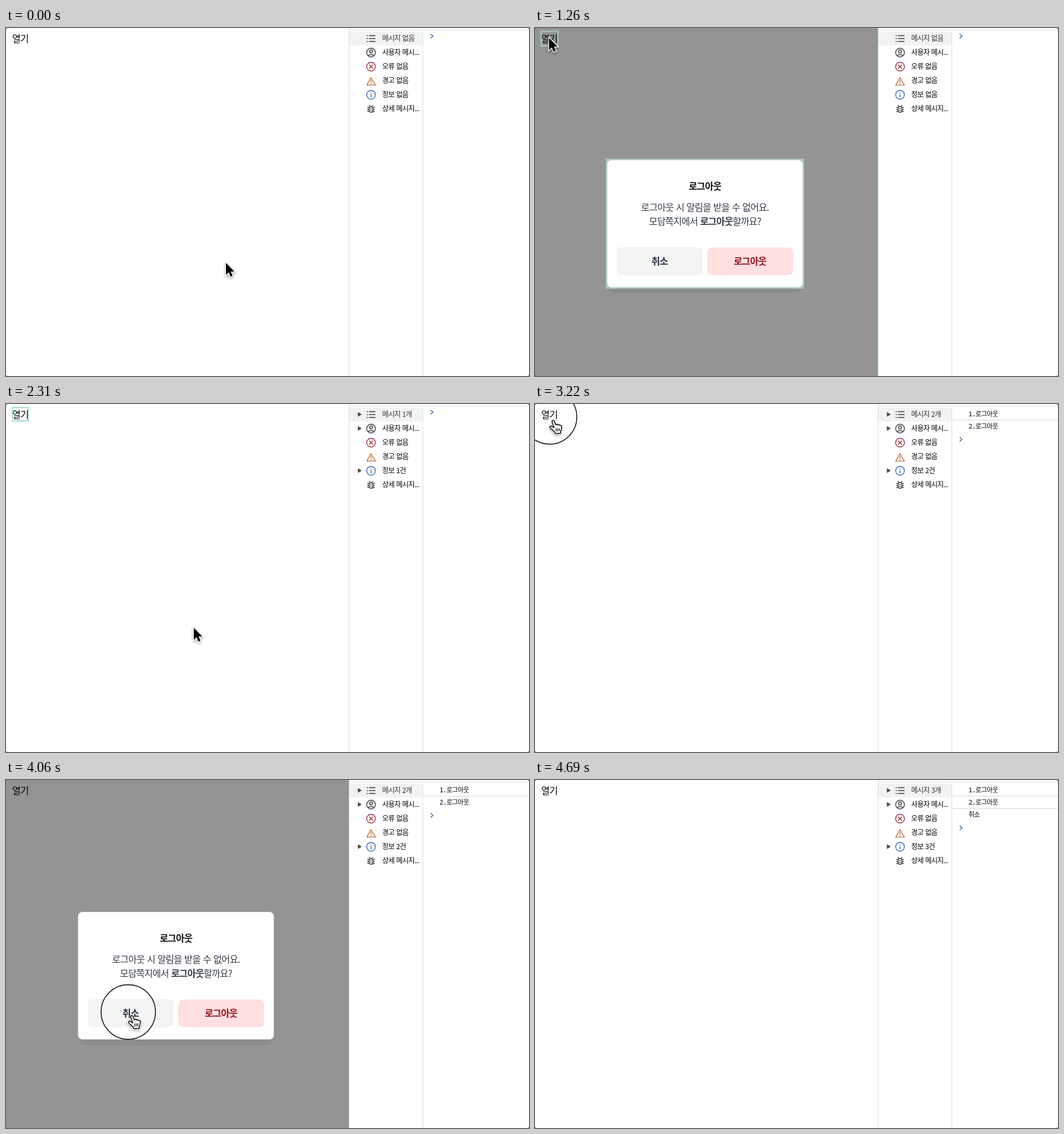
Write an HTML page with a canvas that moves like this. It is 894 px wide and 594 px high and loops after 5.11 s.

```html
<!DOCTYPE html>
<html lang="ko">
<head>
<meta charset="utf-8">
<title>로그아웃</title>
<style>
  html, body { margin: 0; width: 100%; height: 100%; overflow: hidden; background: #fff; }
  canvas { display: block; width: 894px; height: 594px; }
</style>
</head>
<body>
<canvas id="stage" width="894" height="594"></canvas>
<script>
const c = document.getElementById('stage').getContext('2d');
const LOOP = 5110, STEP = 70;
const SANS = '"Noto Sans CJK KR", "Noto Sans CJK", "Noto Sans CJK JP", sans-serif';
const MONO = '"DejaVu Sans Mono", "Noto Sans CJK KR", "Noto Sans CJK JP", monospace';

// Pointer path: time, x, y of the arrow tip
const PATH = [
  [0, 376, 401], [70, 300, 270], [140, 150, 95], [210, 22, 1], [280, 2, 8],
  [420, 2, 8], [700, 8, 6], [980, 24, 17], [1260, 24, 17], [1540, 305, 345],
  [1610, 305, 345], [1890, 323, 381], [1960, 323, 381], [2030, 321, 382],
  [2380, 321, 382], [2800, 30, 22], [2870, 28, 24], [3360, 28, 24],
  [3640, 201, 371], [3710, 201, 371], [3920, 212, 398], [4200, 212, 398],
  [4620, 436, 592]
];

const ARROW = new Path2D('M0 0V18.6L4.3 14.6L7.2 21.4L10.4 20L7.5 13.4H13.2Z');
const HAND = new Path2D('M7.8 12.6L5.3 4.6C4.6 2.2 8 1 9 3.4L11.6 9.6C12.4 7.9 14.6 8.2 15 9.7' +
  'C16 8.6 18 9 18.3 10.6C19.5 9.8 21.6 10.6 21.6 12.4C22 16 20.8 18.5 19.8 20.6L19.6 24L10.6 24.6' +
  'L9.8 22C7 19.6 5 17.6 2.4 15.2C.2 13 2.4 10.8 4.8 12L8.6 14.6Z');
const FINGERS = new Path2D('M11.8 15.6L12.2 20.6M14.6 15.4L14.8 20.4M17.4 15.2V20.2');

const during = (t, from, to) => t >= from && t < to;
const isOpening = t => during(t, 1120, 1400) || during(t, 3290, 3500);

function rect(x, y, w, h, color) {
  c.fillStyle = color;
  c.fillRect(x, y, w, h);
}

function round(x, y, w, h, r, color) {
  c.fillStyle = color;
  c.beginPath();
  c.roundRect(x, y, w, h, r);
  c.fill();
}

function stroke(d, color, width = 1.4) {
  c.strokeStyle = color;
  c.lineWidth = width;
  c.stroke(d instanceof Path2D ? d : new Path2D(d));
}

function circle(x, y, r, color, width = 1.4) {
  c.beginPath();
  c.arc(x, y, r, 0, Math.PI * 2);
  c.strokeStyle = color;
  c.lineWidth = width;
  c.stroke();
}

function at(x, y, draw) {
  c.save();
  c.translate(x, y);
  draw();
  c.restore();
}

// Tight Hangul with open word gaps
function setFont(size, weight = 400, family = SANS) {
  c.font = `${weight} ${size}px ${family}`;
  c.letterSpacing = -0.052 * size + 'px';
  c.wordSpacing = 0.083 * size + 'px';
}

// Text on a line whose visual middle is y
function text(s, x, y, size, color, weight, family) {
  setFont(size, weight, family);
  c.fillStyle = color;
  c.fillText(s, x, y + size * 0.36);
  return c.measureText(s).width;
}

// Centred line made of [string, weight] runs
function centered(runs, x, y, size, color) {
  let width = 0;
  for (const [s, weight] of runs) {
    setFont(size, weight);
    width += c.measureText(s).width;
  }
  let left = x - width / 2;
  for (const [s, weight] of runs) left += text(s, left, y, size, color, weight);
}

const icons = [
  () => {
    for (const y of [-5, 0, 5]) {
      rect(-7.5, y - 0.8, 2, 1.7, '#474747');
      rect(-3.5, y - 0.8, 11, 1.6, '#474747');
    }
  },
  () => {
    circle(0, 0, 7.5, '#3c3c3c');
    circle(0, -2, 2.5, '#3c3c3c');
    stroke('M-5 5.2C-2.5 2.6 2.5 2.6 5 5.2', '#3c3c3c');
  },
  () => {
    circle(0, 0, 7.5, '#a12f35');
    stroke('M-3.2 -3.2L3.2 3.2M3.2 -3.2L-3.2 3.2', '#a12f35');
  },
  () => {
    stroke('M0 -5.4L7.4 7.4H-7.4Z', '#c5704b');
    stroke('M0 -1.2V3M0 4.2V5.7', '#c5704b', 1.5);
  },
  () => {
    circle(0, 0, 7.5, '#3a70b0');
    stroke('M0 -1V4M0 -3.8V-2.2', '#3a70b0', 1.5);
  },
  () => {
    c.beginPath();
    c.roundRect(-3.2, -4, 6.4, 10, 3.2);
    c.strokeStyle = '#3c3c3c';
    c.lineWidth = 1.5;
    c.stroke();
    stroke('M-3.5 -6.5L-1.6 -4.3M3.5 -6.5L1.6 -4.3M-6.5 -2.5H-3.2M6.5 -2.5H3.2' +
      'M-6.5 1H-3.2M6.5 1H3.2M-6.5 4.5H-3.2M6.5 4.5H3.2M-1.4 -.3H1.4M-1.4 2.6H1.4', '#3c3c3c', 1.3);
  }
];

function sidebar(count) {
  const labels = [
    count ? `메시지 ${count}개` : '메시지 없음', '사용자 메시...', '오류 없음',
    '경고 없음', count ? `정보 ${count}건` : '정보 없음', '상세 메시지...'
  ];
  rect(587, 6, 125, 24, '#f1f3f3');
  labels.forEach((label, i) => {
    const y = 18 + i * 24;
    at(624, y, icons[i]);
    text(label, 643, y - 0.3, 12, i ? '#000' : '#303030', 500);
    if (count && (i === 0 || i === 1 || i === 4)) {
      c.fillStyle = '#474747';
      c.fill(new Path2D(`M601.5 ${y - 4.3}L608 ${y - 0.3}L601.5 ${y + 3.7}Z`));
    }
  });
}

function consoleLog(lines) {
  lines.forEach((line, i) => {
    const y = 17 + i * 21.2;
    text(line, 741, y, 11, '#000', 500, MONO);
    if (i < lines.length - 1) rect(713, Math.floor(27 + i * 21.5), 181, 1, '#d3dadd');
  });
  const y = lines.length ? 18 + lines.length * 21.2 : 14;
  stroke(`M726 ${y - 3.6}L729.8 ${y}L726 ${y + 3.6}`, '#3f73ab', 1.5);
}

function panel(t) {
  const count = t < 2310 ? 0 : t < 2380 ? 1 : t < 4130 ? 2 : 3;
  const shown = t < 2380 ? 0 : count;
  rect(586, 0, 308, 594, '#fff');
  rect(586, 0, 1, 594, isOpening(t) ? '#b0d8da' : '#d3dadd');
  rect(587, 3, 307, 1, '#d5dde0');
  sidebar(count);
  rect(712, 4, 1, 590, '#d5dde0');
  consoleLog(['1.로그아웃', '2.로그아웃', '취소'].slice(0, shown));
}

function dialog(ringed) {
  round(126, 235, 329, 218, 12, '#8c8c8c');
  if (ringed) rect(121, 223, 339, 222, '#a9c7c5');
  else round(123, 225, 335, 218, 8, '#d0d0d0');
  round(123.5, 225.5, 334, 217, 7, '#fff');
  centered([['로그아웃', 700]], 290.5, 270, 16, '#111318');
  centered([['로그아웃 시 알림을 받을 수 없어요.', 400]], 290.5, 306, 16, '#333b48');
  centered([['모담쪽지에서 ', 400], ['로그아웃', 700], ['할까요?', 400]], 290.5, 330, 16, '#333b48');
  round(140, 374, 146.5, 48, 8, '#f3f4f4');
  round(294.5, 374.5, 146.5, 47.5, 8, '#ffdfe0');
  centered([['취소', 700]], 213, 398, 16, '#2b3340');
  centered([['로그아웃', 700]], 367.5, 398, 16, '#921118');
}

function ring(x, y, w, h, color, width) {
  c.strokeStyle = color;
  c.lineWidth = width;
  c.strokeRect(x, y, w, h);
}

function openness(t) {
  for (const [from, to] of [[1120, 2310], [3290, 4130]])
    if (during(t, from, to)) return t < from + STEP ? 0.6 : 1;
  return 0;
}

function page(t) {
  const open = openness(t), opening = isOpening(t);
  const closed = during(t, 2310, 2660) || during(t, 4130, 4480);
  text('열기', 10.5, 18, 16, '#000', 500);
  if (closed) ring(11, 6, 27, 23, '#a5dcd6', 2);
  if (!open) return;
  rect(0, 0, 586, 594, `rgba(0,0,0,${0.42 * open})`);
  if (opening) ring(10.5, 5.5, 28.5, 25, '#a3bfbe', 2.5);
  c.globalAlpha = open;
  dialog(opening);
  c.globalAlpha = 1;
}

function position(t) {
  const i = PATH.findIndex(p => p[0] > t);
  if (i < 0) return PATH[PATH.length - 1].slice(1);
  const [t0, x0, y0] = PATH[i - 1], [t1, x1, y1] = PATH[i];
  const k = (t - t0) / (t1 - t0);
  return [x0 + (x1 - x0) * k, y0 + (y1 - y0) * k];
}

function pointer(t) {
  if (t >= 4690) return;
  const [x, y] = position(t);
  const hand = during(t, 2030, 2310) || during(t, 2870, 3290) || during(t, 3780, 4130);
  if (during(t, 3220, 3290) || during(t, 4060, 4130)) circle(x - 3, y - 2, 46.5, '#000', 1.4);
  at(hand ? x - 4 : x, hand ? y + 2 : y, () => {
    c.lineJoin = 'round';
    c.shadowColor = 'rgba(0,0,0,.4)';
    c.shadowBlur = 4;
    c.shadowOffsetY = 2;
    if (hand) {
      stroke(HAND, '#fff', 3);
      c.shadowColor = 'transparent';
      c.fillStyle = '#fff';
      c.fill(HAND);
      stroke(HAND, '#000', 1.5);
      stroke(FINGERS, '#000', 1.2);
    } else {
      c.scale(1.1, 1.1);
      c.lineJoin = 'miter';
      stroke(ARROW, '#fff', 2.4);
      c.shadowColor = 'transparent';
      c.fillStyle = '#000';
      c.fill(ARROW);
    }
  });
}

// Dark slivers outside the rounded window corners
function corners() {
  c.fillStyle = '#555';
  c.beginPath();
  c.rect(0, 0, 894, 594);
  c.roundRect(0, 0, 894, 594, 3);
  c.fill('evenodd');
}

function draw(now) {
  const t = Math.floor(now % LOOP / STEP) * STEP;
  rect(0, 0, 894, 594, '#fff');
  page(t);
  panel(t);
  corners();
  pointer(t);
}

const start = performance.now();
function tick() {
  draw(performance.now() - start);
  requestAnimationFrame(tick);
}
tick();
</script>
</body>
</html>
```
